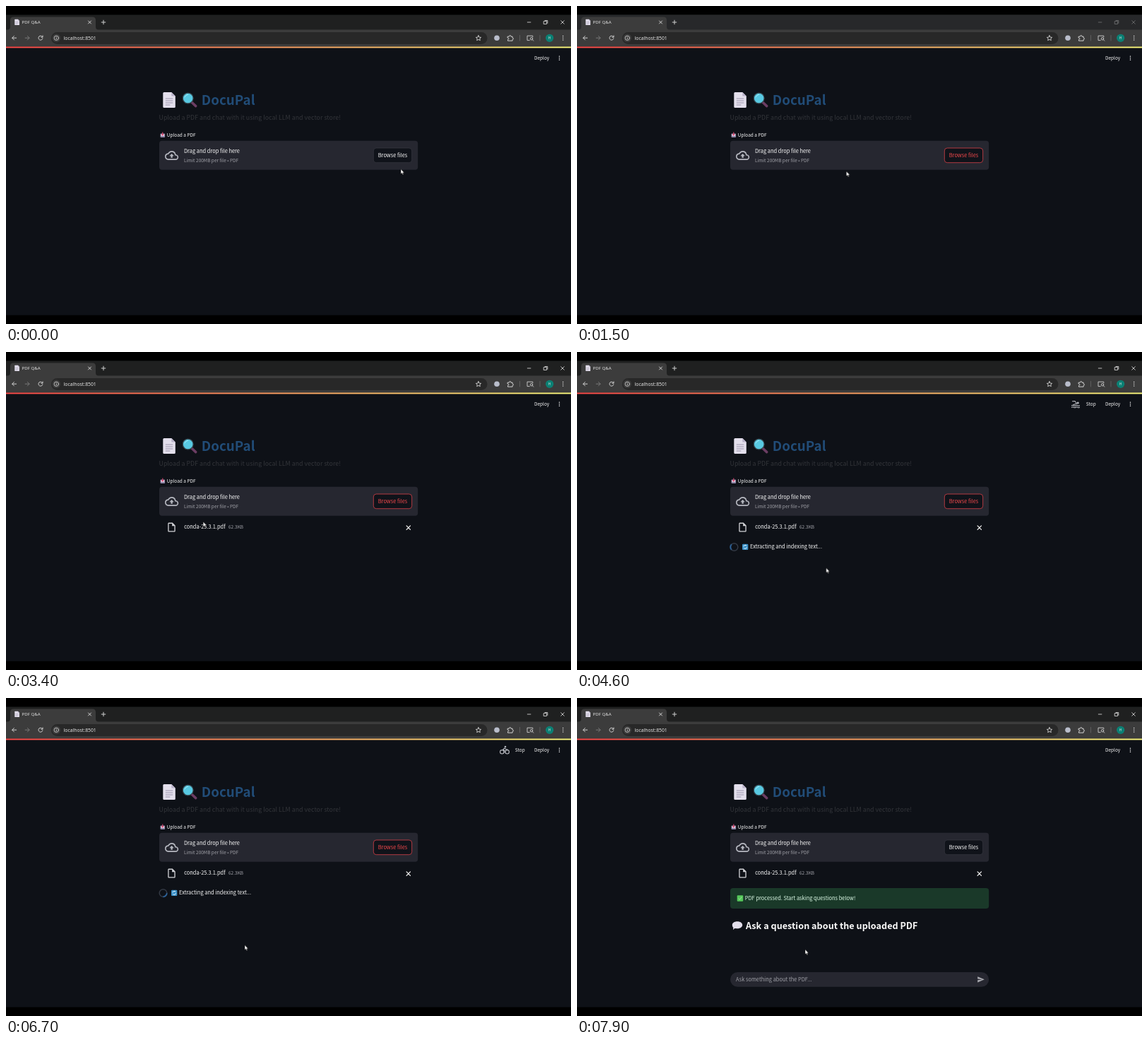
Recreate the animation shown at these times as an HTML page. Size 800x450 px, loop 8000 ms.

```html
<!DOCTYPE html>
<html lang="en">
<head>
<meta charset="utf-8">
<title>PDF Q&amp;A</title>
<style>
  html, body { margin: 0; width: 100%; height: 100%; overflow: hidden; background: #000; }
  svg { display: block; width: 100vw; height: 100vh; }
  text { font-family: "Noto Sans CJK JP", "Noto Sans CJK SC", "Noto Sans CJK", "Open Sans", sans-serif; fill: #fafafa; }
  .body { font-size: 7.45px; }
  .small { font-size: 6.5px; }
  .muted { fill: #a0a1a8; }
  .ui text { font-family: "Noto Sans", "Open Sans", sans-serif; fill: #e3e3e3; }
  .line { fill: none; stroke: #d0d0d0; stroke-linecap: round; stroke-linejoin: round; }
  .sport { stroke: #b9bbc1; }

  /* Every scene toggle shares the 8 s loop */
  .hot, .cold, .inactive, .active, .file, .running, .result { animation: 8s step-end infinite; }
  .hot { animation-name: hot; }
  .cold { animation-name: cold; }
  .inactive { animation-name: inactive; }
  .active { animation-name: active; }
  .file { animation-name: file; }
  .running { animation-name: running; }
  .result { animation-name: result; }
  @keyframes hot { 0% { opacity: 0 } 3.75% { opacity: 1 } 95%, 100% { opacity: 0 } }
  @keyframes cold { 0% { opacity: 1 } 3.75% { opacity: 0 } 95%, 100% { opacity: 1 } }
  @keyframes inactive { 0% { opacity: 0 } 10% { opacity: 1 } 38.75%, 100% { opacity: 0 } }
  @keyframes active { 0% { opacity: 1 } 10% { opacity: .4 } 38.75%, 100% { opacity: 1 } }
  @keyframes file { 0% { opacity: 0 } 40%, 100% { opacity: 1 } }
  @keyframes running { 0% { opacity: 0 } 48.75% { opacity: 1 } 95%, 100% { opacity: 0 } }
  @keyframes result { 0% { opacity: 0 } 95%, 100% { opacity: 1 } }

  .run, .bike, .swim { animation: .8s step-end infinite; }
  .run { animation-name: run; }
  .bike { animation-name: bike; }
  .swim { animation-name: swim; }
  @keyframes run { 0% { opacity: 1 } 25%, 100% { opacity: 0 } }
  @keyframes bike { 0% { opacity: 0 } 25% { opacity: 1 } 62.5%, 100% { opacity: 0 } }
  @keyframes swim { 0% { opacity: 0 } 62.5%, 100% { opacity: 1 } }

  .spinner { transform-origin: 222.5px 276px; animation: spin .8s linear infinite; }
  @keyframes spin { to { transform: rotate(360deg) } }

  .cursor { animation: move 8s linear infinite; }
  @keyframes move {
    0%, 1.25% { transform: translate(559px, 230.7px) }
    3.75%, 15% { transform: translate(553px, 214px) }
    18.75% { transform: translate(381.7px, 234px) }
    26.25%, 36.25% { transform: translate(155px, 138px) }
    42.5% { transform: translate(279px, 240px) }
    47.5%, 58.75% { transform: translate(352.7px, 305.5px) }
    70%, 81.25% { transform: translate(340.5px, 345px) }
    83.75% { transform: translate(338px, 349.5px) }
    92.5% { transform: translate(336px, 351px) }
    98.75%, 100% { transform: translate(323px, 355.7px) }
  }
</style>
</head>
<body>
<svg viewBox="0 0 800 450">
  <defs>
    <linearGradient id="rainbow">
      <stop stop-color="#ff4b4b"/>
      <stop offset="1" stop-color="#fffd80"/>
    </linearGradient>
    <g id="sheet">
      <path d="M0 1.5Q0 0 1.500 0H12L17.500 5.500V20.500Q17.500 22 16 22H1.500Q0 22 0 20.500Z" fill="#e3dfec"/>
      <path d="M12 0V5.500H17.500Z" fill="#b9b2c9"/>
      <path d="M3.500 9H14M3.500 12H14M3.500 15H14M3.500 18H10" stroke="#9d96ae" stroke-width="1"/>
    </g>
    <path id="cross" d="M-1 -1L1 1M1 -1L-1 1" vector-effect="non-scaling-stroke"/>
  </defs>

  <rect width="800" height="450"/>
  <rect y="58" width="800" height="379.500" fill="#0e1117"/>

  <g class="ui">
    <rect y="12.500" width="800" height="24" fill="#1f2020"/>
    <rect class="inactive" y="12.500" width="800" height="24" fill="#27282a"/>
    <path d="M2 33.500Q6 33.500 6 29.500V20Q6 15.500 10.500 15.500H122.500Q127 15.500 127 20V29.500Q127 33.500 131 33.500H800V57.500H0V33.500Z" fill="#3c3c3c"/>
    <rect x="64" y="37" width="617.500" height="17" rx="8.500" fill="#282828"/>
    <use href="#sheet" transform="translate(12.300 18.700) scale(.38)"/>
    <text x="22.600" y="25.300" font-size="6.100">PDF Q&amp;A</text>
    <text x="81.600" y="47.900" font-size="6.800">localhost:8501</text>

    <g class="line">
      <use href="#cross" transform="translate(118.500 23) scale(2)"/>
      <path d="M135.200 23H140.800M138 20.200V25.800"/>
      <path d="M14.600 45.200H8.800M11.400 42.500L8.700 45.200L11.400 47.900"/>
      <path d="M27.200 45.200H33M30.400 42.500L33.100 45.200L30.400 47.900" stroke="#777"/>
      <path d="M51.600 43.700A3 3 0 1 0 51.900 46M52 42V44.200H49.800"/>
      <circle cx="71.300" cy="45.300" r="5.800" fill="#3c3c3c" stroke="none"/>
      <circle cx="71.300" cy="45.300" r="3.200" stroke-width=".8"/>
      <path d="M71.300 45V46.900M71.300 43.600V43.700" stroke-width=".8"/>
      <path d="M669 41.700L670.100 44.100L672.700 44.400L670.800 46.100L671.300 48.700L669 47.400L666.700 48.700L667.200 46.100L665.300 44.400L667.900 44.100Z" stroke-width=".9"/>
      <path d="M710.500 43.200H712.500Q712.500 41.500 713.700 41.500T714.900 43.200H717.100V45.100Q718.500 45.300 718.500 46.300T717.100 47.400V49.200H710.500V47.500Q712 47.300 712 46.300T710.500 45.100Z"/>
      <path d="M745.800 44V42.200H738V48.600H741.300" stroke-width=".9"/>
      <circle cx="744" cy="46.300" r="1.700" stroke-width=".9"/>
      <path d="M745.300 47.600L746.800 49.200" stroke-width=".9"/>
      <path d="M727.500 41.500V49M756 41.500V49" stroke="#666" stroke-width=".8"/>
    </g>
    <circle cx="695" cy="45.300" r="3.800" fill="#b9bdcb"/>
    <circle cx="769.700" cy="45.300" r="5.600" fill="#0b8074"/>
    <text x="769.700" y="47.200" font-size="5" text-anchor="middle">H</text>
    <path d="M788.700 42.500V48.500" stroke="#ddd" stroke-width="1.500" stroke-linecap="round" stroke-dasharray="0 2.700"/>

    <g class="line active" stroke-width=".9">
      <path d="M738.300 23H742.900"/>
      <path d="M761.600 21.700H765.600V25.500H761.600ZM763 20.500H766.800V24.300"/>
      <use href="#cross" transform="translate(788 23) scale(2.300)"/>
    </g>
  </g>
  <rect y="57.500" width="800" height="1.900" fill="url(#rainbow)"/>

  <text class="small" x="748" y="76.200">Deploy</text>
  <path d="M783.500 71.200V77" stroke="#fafafa" stroke-width="1.500" stroke-linecap="round" stroke-dasharray="0 2.500"/>

  <use href="#sheet" x="222.300" y="122"/>
  <path d="M263.500 136.700L268.700 141.600" stroke="#6b3d63" stroke-width="3.600" stroke-linecap="round"/>
  <circle cx="257.700" cy="130.500" r="7.400" fill="#58c9e2" stroke="#37474f" stroke-width="1.200"/>
  <path d="M253 129Q254.300 125.700 257.500 125.300" class="line" stroke-width="1" style="stroke:#a6e9f5"/>
  <text x="276.800" y="140" font-size="18.800" font-weight="700" style="fill:#214c77">DocuPal</text>
  <text x="216.500" y="160.700" font-size="8.850" style="fill:#33353a">Upload a PDF and chat with it using local LLM and vector store!</text>

  <g>
    <rect x="218.500" y="180.500" width="6.600" height="5.400" rx="1" fill="#8c84a5"/>
    <path d="M219.500 181H224V184H219.500Z" fill="#e6e1ee"/>
    <path d="M221.800 178.500V182.500M220.300 181.300L221.800 183L223.300 181.300" fill="none" stroke="#d8436b" stroke-width="1.100"/>
    <text class="small" x="227.800" y="184.700">Upload a PDF</text>
  </g>

  <rect x="217" y="190.700" width="366.200" height="41" rx="4" fill="#262730"/>
  <path transform="translate(225 201.900) scale(.8)" fill="#b6b8c0" d="M19.350 10.040A7.490 7.490 0 0 0 12 4C9.110 4 6.600 5.640 5.350 8.040A6 6 0 0 0 0 14c0 3.310 2.690 6 6 6h13c2.760 0 5-2.240 5-5 0-2.640-2.050-4.780-4.650-4.960zM19 18H6c-2.210 0-4-1.790-4-4 0-2.050 1.530-3.760 3.560-3.970l1.070-.110.500-.950C8.080 7.140 9.940 6 12 6c2.620 0 4.880 1.860 5.390 4.430l.300 1.500 1.530.110A2.980 2.980 0 0 1 22 15c0 1.650-1.350 3-3 3zM8 13h2.550v3h2.900v-3H16l-4-4z"/>
  <text class="body" x="252" y="207.800">Drag and drop file here</text>
  <text class="small muted" x="252" y="220.500">Limit 200MB per file • PDF</text>

  <rect x="520.300" y="201" width="54.400" height="20.700" rx="4" fill="#10131a"/>
  <g class="cold">
    <rect x="520.300" y="201" width="54.400" height="20.700" rx="4" fill="none" stroke="#3a3c44" stroke-width=".7"/>
    <text class="body" x="547.500" y="213.900" text-anchor="middle">Browse files</text>
  </g>
  <g class="hot">
    <rect x="520.300" y="201" width="54.400" height="20.700" rx="4" fill="none" stroke="#d94249" stroke-width=".8"/>
    <text class="body" x="547.500" y="213.900" text-anchor="middle" style="fill:#f0484b">Browse files</text>
  </g>

  <g class="file">
    <path transform="translate(226.700 240.300) scale(.65)" fill="#d2d3d7" d="M14 2H6c-1.100 0-2 .900-2 2v16c0 1.100.900 2 2 2h12c1.100 0 2-.900 2-2V8l-6-6zM6 20V4h7v5h5v11H6z"/>
    <text class="body" x="252.200" y="250.200">conda-25.3.1.pdf</text>
    <text class="small muted" x="315" y="250.200">62.3KB</text>
    <use href="#cross" transform="translate(569.800 248.600) scale(2.700)" class="line" stroke-width="1.200" style="stroke:#fafafa"/>
  </g>

  <g class="running">
    <text class="small" x="720.700" y="76.200">Stop</text>
    <g class="line sport" stroke-width="1.100">
      <g class="swim">
        <circle cx="709.200" cy="72" r="1" fill="#b9bbc1"/>
        <path d="M701.500 69.700L705 69.500L707.500 73L703 74.500M700.500 75.800Q702 74.800 703.400 75.800T706.300 75.800T709 75.800T711.500 75.800M700.500 78.300Q702 77.300 703.400 78.300T706.300 78.300T709 78.300T711.500 78.300"/>
      </g>
      <g class="run">
        <circle cx="707.500" cy="69" r=".9" fill="#b9bbc1"/>
        <path d="M702 73.200L703.500 71.200L706.500 71L705 74.500L707.500 76V79.300M706.500 71L708 73.200L710 73.300M705 74.500L704.300 76.700L701.300 77.300"/>
      </g>
      <g class="bike">
        <circle cx="702.300" cy="76.300" r="2.700"/>
        <circle cx="709.700" cy="76.300" r="2.700"/>
        <circle cx="707" cy="69" r=".8" fill="#b9bbc1"/>
        <path d="M706 77.200V74.500L703.700 73L706 70.800L708 72.700H710"/>
      </g>
    </g>
    <circle cx="222.500" cy="276" r="5.300" fill="none" stroke="#343a45" stroke-width="1.500"/>
    <path class="spinner" d="M218.750 272.250A5.300 5.300 0 0 1 226.250 272.250" fill="none" stroke="#2d74bb" stroke-width="1.500"/>
    <rect x="234" y="271.700" width="8.300" height="8.300" rx="1.200" fill="#3b91c8"/>
    <path d="M236 275.300A2.200 2.200 0 0 1 240 274.300M240.300 276.400A2.200 2.200 0 0 1 236.300 277.400" fill="none" stroke="#fff" stroke-width="1"/>
    <text class="body" x="245" y="278.400">Extracting and indexing text...</text>
  </g>

  <g class="result">
    <rect x="217" y="269" width="366.200" height="29" rx="4" fill="#1a3929"/>
    <rect x="226.700" y="279.200" width="8.500" height="8.500" rx="1" fill="#55c85a"/>
    <path d="M228.700 283.700L230.400 285.400L233.300 281.400" fill="none" stroke="#a3e8a2" stroke-width=".9"/>
    <text class="body" x="237.800" y="286.300" style="fill:#dffde9">PDF processed. Start asking questions below!</text>
    <path d="M227 316.300C231.500 316.300 234.200 318.500 234.200 321.300S231.200 326.300 227 326.300L223.300 326L221 328L221.300 325C220.300 324 219.800 322.800 219.800 321.300C219.800 318.500 222.500 316.300 227 316.300Z" fill="#e2deeb"/>
    <text x="239" y="326.700" font-size="12.670" font-weight="700">Ask a question about the uploaded PDF</text>
    <rect x="217" y="388" width="366.200" height="20.800" rx="10.400" fill="#262730"/>
    <text class="body muted" x="225" y="400.500">Ask something about the PDF...</text>
    <path transform="translate(566.300 392.800) scale(.46)" fill="#a9aab0" d="M2 21 23 12 2 3V10l15 2-15 2z"/>
  </g>

  <path class="cursor" d="M0 0V7L1.600 5.600L2.700 8.100L3.900 7.600L2.800 5.200H5Z" fill="#fff" stroke="#000" stroke-width=".5"/>
</svg>
</body>
</html>
```
